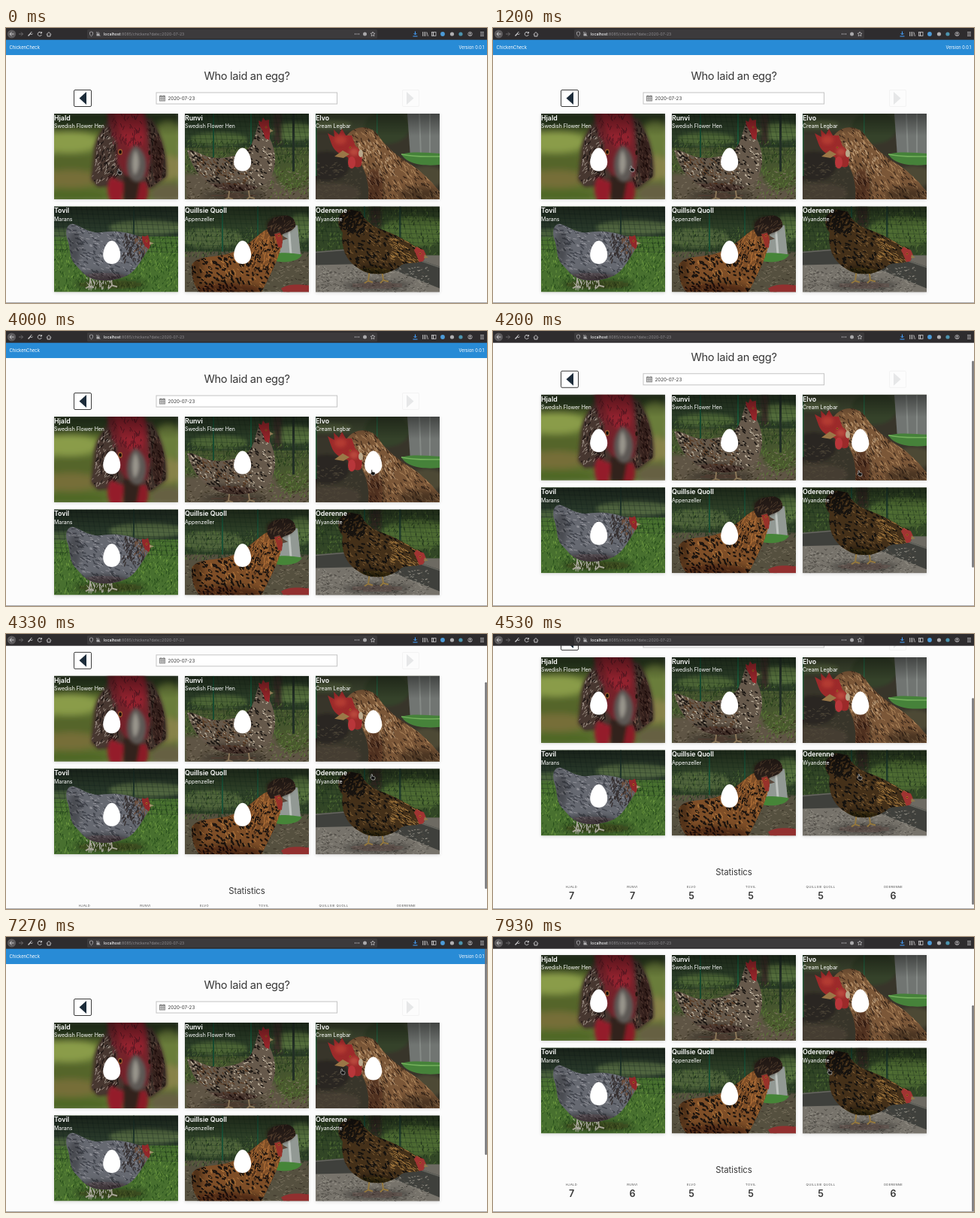
An HTML page that plays this animation: 640x366 px, repeating every 8 s.

```html
<!DOCTYPE html>
<html lang="en">
<head>
<meta charset="utf-8">
<title>ChickenCheck</title>
<style>
html, body { margin: 0; width: 100%; height: 100%; overflow: hidden; background: #fcfcfc; }
svg { display: block; width: 640px; height: 366px; font-family: Inter, "Open Sans", sans-serif; }
</style>
</head>
<body>
<svg id="stage" viewBox="0 0 640 366" xmlns="http://www.w3.org/2000/svg"></svg>
<script>
const LOOP = 8000;
const hens = [
  { name: 'Hjald', breed: 'Swedish Flower Hen', count: 7, labelX: 104.5, egg: t => t >= 750 },
  { name: 'Runvi', breed: 'Swedish Flower Hen', count: 7, labelX: 185.5, egg: t => t < 5900 },
  { name: 'Elvo', breed: 'Cream Legbar', count: 5, labelX: 264, egg: t => t >= 1950 },
  { name: 'Tovil', breed: 'Marans', count: 5, labelX: 343, egg: () => true },
  { name: 'Quillsie Quoll', breed: 'Appenzeller', count: 5, labelX: 436, egg: () => true },
  { name: 'Oderenne', breed: 'Wyandotte', count: 6, labelX: 532.5, egg: () => false }
];

// Drawing helpers
let seed = 7;
const rand = () => (seed = (seed * 16807) % 2147483647) / 2147483647;
const rect = (x, y, w, h, fill, more = '') => `<rect x="${x}" y="${y}" width="${w}" height="${h}" fill="${fill}" ${more}/>`;
const oval = (x, y, rx, ry, fill, more = '') => `<ellipse cx="${x}" cy="${y}" rx="${rx}" ry="${ry}" fill="${fill}" ${more}/>`;
const shape = (d, fill, more = '') => `<path d="${d}" fill="${fill}" ${more}/>`;
const line = (d, color, width = 1, more = '') => `<path d="${d}" fill="none" stroke="${color}" stroke-width="${width}" ${more}/>`;
const text = (x, y, size, fill, str, more = '') => `<text x="${x}" y="${y}" font-size="${size}" fill="${fill}" ${more}>${str}</text>`;
const soft = (content, blur = 2) => `<g filter="url(#blur${blur})">${content}</g>`;
const shadow = (x, y, rx, ry, strength = 0.5) => soft(oval(x, y, rx, ry, '#100c08', `opacity="${strength}"`), 4);

// Scattered short strokes: feathers, grass, gravel
function flecks(count, [x, y, w, h], color, width, length, angle = 0, spread = 0.6) {
  let d = '';
  for (let i = 0; i < count; i++) {
    const a = angle + (rand() - 0.5) * 2 * spread, l = length * (0.5 + rand());
    d += `M${(x + rand() * w).toFixed(1)} ${(y + rand() * h).toFixed(1)}l${(Math.cos(a) * l).toFixed(1)} ${(Math.sin(a) * l).toFixed(1)}`;
  }
  return line(d, color, width, 'stroke-linecap="round"');
}
const grass = (box, dark, light) =>
  flecks(220, box, dark, 1, 2.5, -1.4) + flecks(180, box, light, 0.7, 2.5, -1.4);

let clips = 0;
function plumage(d, fill, inner) {
  const id = 'clip' + clips++;
  return `<clipPath id="${id}"><path d="${d}"/></clipPath>` + shape(d, fill) + `<g clip-path="url(#${id})">${inner}</g>`;
}

function netting(h, color) {
  let d = '';
  for (let x = -20; x < 170; x += 7) d += `M${x} 0l10 ${h}`;
  for (let y = 3; y < h; y += 6) d += `M0 ${y}l165 4`;
  return line(d, color, 0.5, 'opacity=".6"');
}
const legs = (x, gap, y, color) => line(`M${x} ${y}l-2 16l-5 3m5 -3l6 2M${x + gap} ${y}l2 15l-4 4m4 -4l7 2`, color, 2);
const eye = (x, y) => oval(x, y, 1.3, 1.3, '#c9752b') + oval(x, y, 0.7, 0.7, '#120c08');

// Each scene fills a 165 x 114 tile
const scenes = [
  () => soft(
    rect(-5, -5, 175, 124, '#5b6e2e') + rect(-5, -5, 175, 26, '#2f4022') +
    oval(20, 38, 40, 14, '#8a9c48') + oval(25, 66, 45, 12, '#54652c') + oval(22, 87, 38, 12, '#766e37') + oval(20, 110, 50, 10, '#4f6828') +
    oval(152, 34, 20, 24, '#6b7d3b') + oval(153, 72, 20, 16, '#878249') + oval(152, 106, 26, 14, '#666043'), 4) +
    soft(shape('M75 4C62 20 54 34 52 52L49 88L58 98L86 96L130 100L150 84C152 56 144 28 130 6Z', '#45342c')) +
    plumage('M78 8C63 20 54 36 56 54L50 86L58 96L84 92L128 98L148 84C150 56 143 28 128 8Z', '#473730',
      flecks(130, [48, 10, 38, 88], '#a89b90', 0.9, 3.5, 2) + flecks(110, [48, 10, 40, 88], '#1d1614', 1.2, 3.5, 2) +
      flecks(80, [122, 10, 28, 88], '#806454', 0.9, 3.5, 1.2) + flecks(90, [122, 10, 28, 88], '#211613', 1.4, 3.5, 1.2) +
      shadow(138, 60, 8, 35)) +
    soft(shape('M70 -4C72 12 76 28 84 40L84 66L96 84L124 84L128 58C124 36 127 16 120 -4Z', '#74202a') +
      shape('M80 -4C82 12 88 30 100 46L118 42C121 26 120 10 116 -4Z', '#92242f') +
      shape('M76 84C69 92 70 108 76 118H90L93 92Z', '#941f2a') + shape('M104 92L122 90C127 100 126 112 120 118H104Z', '#8a1c27') +
      shape('M92 82H116L110 116H92Z', '#33201d')) +
    flecks(60, [78, 0, 38, 42], '#591722', 1, 4, 1.5) +
    soft(shape('M108 42C98 50 94 68 99 82C104 91 113 95 119 85C126 70 123 50 108 42Z', '#5d5955') +
      shape('M108 48C103 60 103 72 107 82C114 74 115 60 108 48Z', '#9a968d')) +
    oval(88, 51, 3, 4, '#9a5a2c') + oval(88, 51, 1.8, 2.6, '#120d0a') + oval(127, 52, 1.6, 3, '#22130d'),

  () => rect(0, 0, 165, 114, '#46552f') + rect(0, 0, 165, 45, '#2b3d27') +
    soft(oval(145, 24, 30, 12, '#566f3d') + oval(45, 34, 38, 9, '#4b6335') + rect(118, 0, 11, 42, '#372f28')) +
    grass([0, 36, 165, 42], '#243b1a', '#64833c') + soft(rect(0, 80, 165, 41, '#5e5444') + oval(145, 85, 24, 16, '#48592f')) +
    flecks(180, [0, 76, 165, 40], '#847a66', 0.8, 2, 0) + flecks(130, [0, 76, 165, 40], '#37301f', 1, 2, 0) + flecks(90, [110, 70, 55, 44], '#5c7a37', 0.9, 3, -1.2) +
    netting(55, '#14261a') + rect(37, 0, 2, 60, '#174b30') + rect(87, 0, 2, 45, '#1a5537') + rect(143, 0, 3, 77, '#222f25') +
    shadow(65, 109, 45, 4) + legs(60, 24, 96, '#8a7658') +
    plumage('M3 49C10 47 19 53 30 57C48 62 72 57 84 47C94 37 94 20 99 12C109 9 113 18 113 33C121 49 124 71 112 88C96 107 55 108 34 94C17 84 9 68 3 49Z', '#66594b',
      flecks(320, [0, 8, 125, 100], '#1d1814', 1.7, 2.5, 0.6) + flecks(300, [0, 8, 125, 100], '#c9bda8', 1.1, 1.8, 0.6) +
      flecks(90, [15, 50, 70, 45], '#5d4029', 1.3, 3, 0.6) + shadow(55, 102, 48, 10)) +
    shape('M99 15L98 9L102 11L104 5L107 9L112 8L112 16L114 22L112 35L107 33L104 24Z', '#96252a') + shape('M113 20l5 3l-5 2Z', '#a08a60') + eye(108, 18),

  () => soft(rect(-5, -5, 175, 124, '#37342a') + rect(-5, -5, 175, 28, '#3f4a32') + oval(95, 18, 30, 22, '#34432a') +
    oval(15, 70, 30, 20, '#292720') + oval(20, 106, 40, 14, '#443c30') + oval(20, 14, 28, 5, '#56643f') + oval(148, 84, 25, 14, '#4d4a36')) +
    rect(0, 0, 1.5, 83, '#275b38') + rect(81, 0, 1.5, 40, '#276140') + flecks(110, [0, 65, 60, 49], '#514a3a', 0.8, 3) +
    shape('M122 0H165V58H126Z', '#717572') + line('M138 0l2 55M152 0v55', '#858a86', 2) +
    shape('M114 54C129 50 147 52 165 53V68C145 70 122 68 114 54Z', '#46823a') + line('M114 54C130 58 145 57 165 57', '#74b05c', 1.5) +
    plumage('M41 30C50 16 70 14 82 27C93 44 107 55 124 66C143 78 156 92 165 104V114H70C72 98 68 80 60 66C47 63 38 47 41 30Z', '#7b5738',
      flecks(330, [38, 16, 128, 98], '#b38b5f', 0.9, 4.5, 0.95, 0.3) + flecks(290, [38, 16, 128, 98], '#3b281b', 1.1, 3.5, 0.95, 0.4) +
      flecks(100, [55, 35, 50, 60], '#d3b48d', 0.8, 4, 1.1, 0.3) + shadow(78, 100, 12, 28, 0.45) + shadow(140, 108, 30, 10, 0.4)) +
    shape('M43 58C30 54 24 48 21 40L16 26L25 31L24 21L31 28L35 20L40 29L48 29L53 43C61 48 64 62 60 70C54 74 46 68 44 63Z', '#9c2a2a') +
    soft(oval(33, 35, 8, 6, '#b33a33') + oval(51, 51, 6, 5, '#ba4a3d')) +
    oval(48, 65, 5, 8, '#b8363a') + oval(60, 53, 3, 5, '#b9a98c') + shape('M36 49L25 57L37 59L45 54Z', '#9a7747') + eye(46, 45),

  () => rect(0, 0, 165, 114, '#48702f') + rect(0, 0, 165, 40, '#29392a') + soft(oval(123, 28, 50, 10, '#51663f') + oval(20, 36, 30, 6, '#48603a')) +
    grass([0, 40, 165, 74], '#234719', '#669440') + grass([0, 52, 165, 62], '#2f571f', '#7aa745') +
    netting(62, '#111f1b') + rect(105, 0, 2, 74, '#20362b') +
    shadow(75, 104, 50, 6) + legs(49, 26, 90, '#a5a294') + flecks(40, [43, 90, 36, 18], '#b3b1aa', 1, 4, 1.5) +
    plumage('M18 45C13 30 19 19 30 25C42 30 50 37 66 34C84 32 99 35 114 40C127 40 131 49 124 59C117 69 111 84 97 92C75 102 50 101 38 88L27 76C20 67 22 56 18 45Z', '#666971',
      flecks(230, [15, 19, 115, 82], '#42454d', 1.5, 4, 0.5) + flecks(210, [15, 19, 115, 82], '#92939a', 1, 3, 0.5) +
      flecks(70, [92, 36, 30, 36], '#352f2f', 1.4, 4, 1.9) + flecks(50, [108, 38, 22, 24], '#6f503d', 1.2, 3, 1.6) +
      shadow(65, 98, 40, 10) + shadow(27, 55, 8, 24, 0.3)) +
    shape('M117 44L117 39L121 40L125 38L127 45L129 49L126 57L121 53Z', '#92282a') + shape('M127 47l6 2l-6 2Z', '#a3946e') + eye(123, 46),

  () => rect(0, 0, 165, 114, '#55503f') + rect(0, 0, 165, 60, '#2f4128') + soft(oval(35, 42, 42, 13, '#4f643b') + oval(154, 28, 18, 18, '#55703e')) +
    grass([0, 30, 165, 38], '#22361e', '#587639') + flecks(200, [0, 70, 165, 44], '#7d7461', 0.8, 2.5) + flecks(120, [0, 70, 165, 44], '#373025', 1, 2.5) +
    netting(60, '#17291c') + rect(49, 0, 2, 60, '#1b5237') + rect(96, 0, 2, 50, '#1d4f35') +
    shape('M112 25H150L154 64H116Z', '#929994') + line('M138 26l3 37', '#bec3bf', 3) +
    shape('M116 64C129 60 143 62 156 64C151 75 128 76 116 71Z', '#468538') + shape('M128 109C139 102 154 104 165 105V114H131Z', '#92302f') +
    plumage('M9 78C16 66 34 68 54 64C76 59 89 45 102 35C114 25 128 30 131 41C128 57 122 75 113 92L102 114H20C10 104 9 90 9 78Z', '#7e4e27',
      flecks(280, [5, 45, 128, 70], '#1c140f', 2.2, 3, 0.8) + flecks(200, [5, 25, 128, 90], '#b97d3f', 1, 2.5, 0.8) +
      flecks(100, [84, 28, 44, 56], '#a96a34', 1.2, 4.5, 1.9, 0.3) + flecks(60, [84, 28, 44, 60], '#2a1a11', 1, 3, 1.9, 0.3) +
      shadow(55, 112, 48, 10) + shadow(15, 85, 8, 22, 0.4)) +
    soft(oval(126, 25, 17, 11, '#2a1e18')) + plumage('M110 33C108 22 116 13 128 13C139 9 149 17 147 27C141 35 132 34 127 39L114 40Z', '#281d18',
      flecks(50, [108, 8, 42, 32], '#5b4432', 0.9, 5, -0.8)) +
    shape('M119 37L127 35L130 44L129 55L124 54L122 46Z', '#98322a') + shape('M130 39l7 4l-7 2Z', '#594639') + eye(125, 39),

  () => rect(0, 0, 165, 114, '#6d6a62') + rect(0, 0, 165, 65, '#324626') + soft(oval(133, 33, 45, 20, '#4e6a32') + rect(72, 0, 15, 28, '#302c23')) +
    grass([0, 5, 165, 60], '#21351b', '#5d7f38') + netting(50, '#14271d') + rect(64, 0, 2, 40, '#1b4a35') + rect(111, 0, 2.5, 52, '#213d2c') +
    shape('M0 60L85 53L165 80V110L85 78L0 80Z', '#3f403c') + line('M0 61L86 54L165 81', '#66665f', 1.5) +
    shape('M0 78L83 76L165 109V114H0Z', '#77736b') + flecks(240, [0, 80, 150, 34], '#948f86', 0.9, 2, 0) + flecks(180, [0, 80, 150, 34], '#4c4943', 0.9, 2, 0) +
    shadow(82, 105, 45, 5) + legs(72, 16, 83, '#94783f') +
    plumage('M36 35C25 21 31 7 45 4L60 7C65 18 73 25 86 30C103 36 119 44 132 53C143 54 149 62 144 71C134 78 123 73 114 78C100 91 74 94 58 83C42 74 33 57 36 35Z', '#443019',
      flecks(290, [27, 3, 122, 89], '#14110e', 2, 3, 0.7) + flecks(260, [27, 3, 122, 89], '#8c683a', 0.8, 2.5, 0.7) +
      flecks(80, [98, 42, 42, 34], '#a67a3e', 1, 4, 0.6, 0.3) + flecks(90, [29, 3, 34, 35], '#17130f', 2, 5, -1) +
      shadow(75, 90, 35, 9, 0.6)) +
    shape('M131 58L134 54L138 56L144 58L147 65L143 73L138 74L135 67Z', '#a13432') + shape('M145 64l5 4l-6 1Z', '#8e7b4c') + eye(139, 63)
];

const eggPath = 'M0 -15.5C6 -15.5 11.5 -4.5 11.5 3.5C11.5 11 6.5 15.5 0 15.5S-11.5 11 -11.5 3.5C-11.5 -4.5 -6 -15.5 0 -15.5Z';

const tile = (hen, i) => {
  const x = 64 + (i % 3) * 174, y = i < 3 ? 114 : 237.5;
  return `<g transform="translate(${x} ${y})">` +
    rect(0, 1, 165, 114, '#000', 'opacity=".14" filter="url(#blur2)"') +
    `<g clip-path="url(#tile)">${scenes[i]()}${rect(0, 0, 165, 30, 'url(#shade)')}</g>` +
    text(0, 8.8, 8.8, '#fff', hen.name, 'font-weight="600"') +
    text(0, 19.4, 6.95, '#fff', hen.breed) +
    shape(eggPath, '#fff', `id="egg${i}" transform="translate(76.7 61)"`) + '</g>';
};

const stat = (hen, i) =>
  text(hen.labelX, 420.8, 4.1, '#4a4a4a', hen.name.toUpperCase(), 'text-anchor="middle" letter-spacing=".4"') +
  text(hen.labelX, 436.2, 12.5, '#363636', hen.count, `id="count${i}" text-anchor="middle" font-weight="600"`);

const page = () =>
  rect(0, 15, 640, 21, '#288bd6') +
  text(4.5, 28, 5.9, '#fff', 'ChickenCheck') +
  text(636, 28, 5.65, '#fff', 'Version 0.0.1', 'text-anchor="end"') +
  text(320.5, 69.3, 14.6, '#363636', 'Who laid an egg?', 'text-anchor="middle" letter-spacing="-.3"') +
  rect(90.5, 82.5, 23, 22, '#fff', 'rx="1.5" stroke="#3b3b3b"') + shape('M97.5 93.5L107 85V102Z', '#1d2c3a') +
  rect(527.5, 82.5, 22, 22, '#fcfcfc', 'rx="1.5" stroke="#f3f3f3"') + shape('M542.5 93.5L533 85V102Z', '#e6e7e8') +
  rect(200, 86, 240.5, 15, '#fff', 'stroke="#c4c4c4"') +
  rect(204.5, 90.5, 7, 6.5, '#ddd', 'stroke="#888"') + line('M204 91.5h8M206 89v2M210 89v2M205 94h6M207 92v5M209.3 92v5', '#888', 0.8) +
  text(215.5, 96, 6.2, '#363636', '2020-07-23') +
  hens.map(tile).join('') +
  text(320.5, 403.8, 11.3, '#363636', 'Statistics', 'text-anchor="middle"') +
  hens.map(stat).join('');

const toolbar = () => {
  const pale = '#c9c8ca';
  return rect(0, 0, 640, 15.7, '#2e2c2e') + rect(108, 2, 386, 12, '#3c3a3c', 'rx="1.5"') +
    oval(7.5, 8, 5.6, 5.6, '#5d5b5d') + line('M10.5 8H5M7.5 5.5L5 8l2.5 2.5', pale) +
    line('M17 8h5.5M20 5.5l2.5 2.5l-2.5 2.5', '#6b696b') +
    line('M29.5 10.5l3.5 -3.5', pale, 1.5) + line('M34.5 5.5a1.5 1.5 0 1 0 1 2', pale) +
    line('M47 6.5a2.6 2.6 0 1 0 .3 2.5M47.5 5v2h-2', pale) +
    line('M54 8.5L57 5.5l3 3M55 8v3h4v-3', pale) +
    line('M111.5 5.7l2 -.7l2 .7v2.3q-.4 2 -2 3q-1.6 -1 -2 -3Z', '#b0afb1', 0.8) +
    rect(120.5, 7.5, 4, 3, '#b0afb1') + line('M121 7.5v-1q1.5 -2 3 0v1M120 5l5.5 6', '#b0afb1', 0.7) +
    text(130, 10, 5.2, '#8f8d90', `<tspan fill="#f5f5f6" font-weight="500">localhost</tspan>:8085/chickens?date=2020-07-23`) +
    [464.5, 467, 469.5].map(x => oval(x, 8, 0.7, 0.7, pale)).join('') + oval(477.5, 8, 2.5, 2.5, '#a9a8aa') +
    line('M488 5l.9 2l2.1 .2l-1.6 1.4l.5 2.2l-1.9 -1.2l-1.9 1.2l.5 -2.2l-1.6 -1.4l2.1 -.2Z', pale, 0.7) +
    line('M544.5 4.5v4M542.5 7l2 2l2 -2M541.5 11h6', '#45a1ff') +
    line('M554.5 5v6M556.5 5v6M558.3 5v6M560 5.5l1.5 5.5', pale, 0.8) +
    rect(566.5, 5.5, 5.5, 5, 'none', `stroke="${pale}" stroke-width=".8"`) + line('M568.5 5.5v5', pale, 1.2) +
    oval(581, 8, 2.9, 2.9, '#4c9bd8') + oval(593.5, 8, 2.6, 2.6, '#b0afb1') + oval(605, 8, 2.6, 2.6, '#4d94ae') +
    oval(617.5, 8, 2.7, 2.7, 'none', `stroke="${pale}" stroke-width=".7"`) + oval(617.5, 7.2, 1, 1, pale) + line('M616 9.8q1.5 -1.5 3 0', pale, 0.8) +
    line('M631 5.7h5M631 8h5M631 10.3h5', pale, 0.9);
};

const blurs = [2, 4].map(n => `<filter id="blur${n}" x="-50%" y="-50%" width="200%" height="200%"><feGaussianBlur stdDeviation="${n}"/></filter>`).join('');
document.getElementById('stage').innerHTML =
  `<defs>${blurs}<clipPath id="tile"><rect width="165" height="114"/></clipPath>
  <linearGradient id="shade" x2="0" y2="1"><stop stop-opacity=".42"/><stop offset="1" stop-opacity="0"/></linearGradient></defs>` +
  rect(0, 0, 640, 366, '#fcfcfc') + `<g id="page">${page()}</g>` +
  rect(637.3, 15, 2.5, 275, '#707073', 'id="thumb" rx="1.2"') + rect(0, 365, 640, 1, '#a9a9ab') + toolbar() +
  shape('M-1 0q.8 -.8 1.5 0v2.3l3 .8q.8 .4 .6 1.3l-.6 2.6h-3.5l-2.3 -3q.4 -1 1.3 -.2Z', '#111', 'id="cursor" stroke="#fff" stroke-width=".5"');

// Motion: keys are [time, ...values]
const scrollKeys = [[4070, 0], [4330, 58], [4500, 82], [4730, 90], [6550, 90], [6800, 35], [7000, 0], [7300, 0], [7450, 58], [7600, 90]];
const cursorKeys = [[0, 150, 188], [500, 143, 184], [1050, 143, 184], [1750, 487, 185], [4070, 487, 185], [4330, 487, 187],
  [4650, 487, 187], [5400, 305, 75], [6270, 305, 75], [6900, 447, 176]];

function sample(keys, t, ease = k => k) {
  const next = keys.findIndex(key => key[0] > t);
  if (next === 0) return keys[0].slice(1);
  if (next < 0) return keys[keys.length - 1].slice(1);
  const a = keys[next - 1], b = keys[next], k = ease((t - a[0]) / (b[0] - a[0]));
  return a.slice(1).map((v, i) => v + (b[i + 1] - v) * k);
}
const smooth = k => k * k * (3 - 2 * k);
const el = id => document.getElementById(id);
const parts = { page: el('page'), thumb: el('thumb'), cursor: el('cursor'), count: el('count1'), eggs: hens.map((_, i) => el('egg' + i)) };

function update(t) {
  const [scroll] = sample(scrollKeys, t);
  const [x, y] = sample(cursorKeys, t, smooth);
  parts.page.setAttribute('transform', `translate(0 ${-scroll})`);
  parts.thumb.setAttribute('y', 15 + scroll * 0.845);
  parts.thumb.setAttribute('visibility', t >= 4070 ? 'visible' : 'hidden');
  parts.cursor.setAttribute('transform', `translate(${x} ${y})`);
  hens.forEach((hen, i) => parts.eggs[i].setAttribute('visibility', hen.egg(t) ? 'visible' : 'hidden'));
  parts.count.textContent = t < 6300 ? 7 : 6;
}

const start = performance.now();
function frame() {
  update((performance.now() - start) % LOOP);
  requestAnimationFrame(frame);
}
frame();
</script>
</body>
</html>
```
